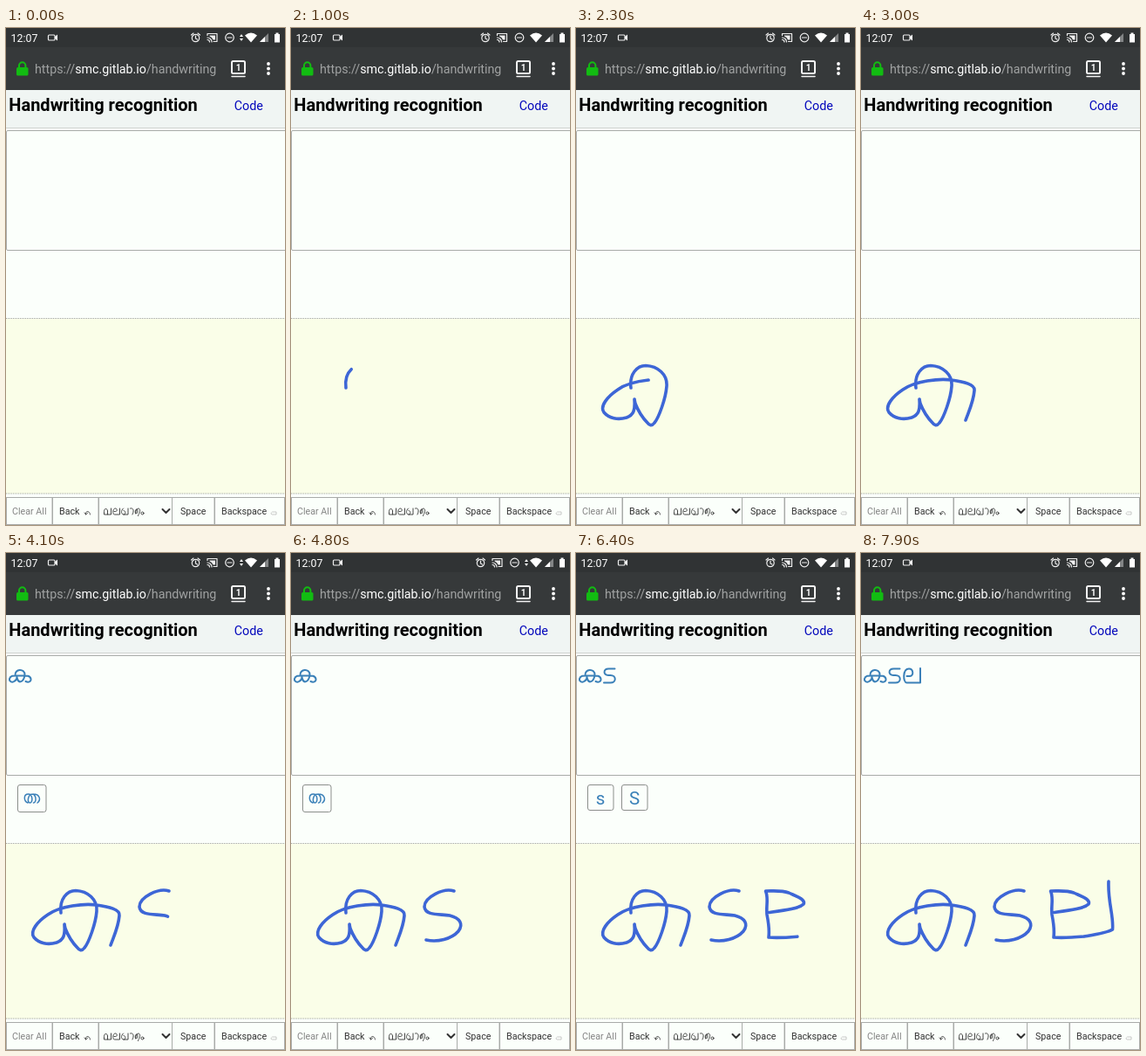
Write an HTML page that moves like this. It is 320 px wide and 569 px high and loops after 8 s.

```html
<!DOCTYPE html>
<html lang="en">
<head>
<meta charset="utf-8">
<title>Handwriting recognition</title>
<style>
  html, body { margin: 0; width: 100%; height: 100%; overflow: hidden; background: #fbfffb; }
  svg { display: block; width: 100vw; height: 100vh; }
  text { font-family: Roboto, "Noto Sans", sans-serif; }
  .line { fill: none; stroke-linecap: round; stroke-linejoin: round; }
  .ink { stroke: #3d66d6; stroke-width: 3.6; }
  .glyph { stroke: #3a80b8; stroke-width: 2; }
  .box { fill: #fbfffb; stroke: #a9aba9; }
  .key { fill: #fbfffb; stroke: #8c8e8c; }
  .dots { stroke: #9c9e98; stroke-dasharray: 1 1; }
  .btn { font-size: 10.7px; fill: #333; }
</style>
</head>
<body>
<svg viewBox="0 0 320 569">
  <rect width="320" height="569" fill="#fbfffb"/>

  <!-- status bar -->
  <rect width="320" height="71" fill="#36393a"/>
  <rect width="320" height="22" fill="#303334"/>
  <g fill="#fff">
    <text x="5.5" y="15.5" font-size="12.4">12:07</text>
    <path d="M56 10l3-2.5v7l-3-2.5z"/>
    <path d="M274 8.5Q281 2.500 288 8.500L281 16.500z"/>
    <path d="M301 6v10h-10z" opacity=".4"/>
    <path d="M297 10v6h-6z"/>
    <path d="M308 7h1.500V5.500h3V7h1.500v9.500h-6z"/>
    <path id="traffic" d="M268 10l2-3 2 3zM268 12l2 3 2-3z"/>
  </g>
  <g class="line" stroke="#eee" stroke-width="1.200">
    <rect x="48.500" y="8" width="7.500" height="6" rx="1"/>
    <g id="icons">
      <circle cx="217.500" cy="11.500" r="4.200"/>
      <path d="M217.500 9v3l2 1M212.500 8l2.500-2M222.500 8l-2.500-2"/>
      <path d="M231 8.500V6.500H242V15.500H238M231 11a5 5 0 0 1 5 5M231 13.500a2.500 2.500 0 0 1 2.500 2.500"/>
      <path d="M233.500 8.500h6.500v5h-2.500q-1-3-4-4z" fill="#eee" stroke="none"/>
      <circle cx="256.500" cy="11" r="4.800"/>
      <path d="M254 11h5"/>
    </g>
  </g>

  <!-- address bar -->
  <rect x="12" y="45" width="13.500" height="9.500" rx="1.500" fill="#12bc12"/>
  <path class="line" d="M15 45v-2a3.700 3.700 0 0 1 7.400 0v2" stroke="#12bc12" stroke-width="2"/>
  <text x="33" y="52" font-size="14.25" fill="#a0a2a2">https://<tspan fill="#fff">smc.gitlab.io</tspan>/handwriting</text>
  <g class="line" stroke="#f4f4f4" stroke-width="2">
    <rect x="259" y="38" width="15" height="14" rx="1.500"/>
    <path d="M259 55.500h15" stroke-width="1.500"/>
  </g>
  <text x="266.500" y="49" font-size="10" font-weight="700" fill="#fff" text-anchor="middle">1</text>
  <g fill="#fff"><circle cx="301" cy="41" r="1.900"/><circle cx="301" cy="46.500" r="1.900"/><circle cx="301" cy="52" r="1.900"/></g>

  <!-- page -->
  <rect y="71" width="320" height="43" fill="#f0f5f3"/>
  <path d="M0 114.500h320" stroke="#cfd2d0"/>
  <text x="3.300" y="95" font-size="20" font-weight="700">Handwriting recognition</text>
  <text x="261.700" y="94" font-size="14.3" fill="#0408bc">Code</text>
  <rect class="box" x=".5" y="117.500" width="321" height="137" rx="1.500"/>
  <rect y="333" width="320" height="200" fill="#fafee8"/>
  <path class="dots" d="M0 332.500h320M0 533h320"/>

  <!-- recognised letters -->
  <g class="line glyph" transform="translate(0 -.5)">
    <path data-on="3200" d="M10 147C7 149.500 3.500 147.500 4 144.500C5 140 10 141 16 141S27.500 140 28.500 144.500C29 148 25.500 149 22.500 147.500M10.500 141C9.500 132.500 22 132.500 21.500 140C21 145 19 147.500 16 148C13 147.500 13 144.500 12.500 142.500C12.500 145 12 146 10 147"/>
    <path data-on="5000" d="M44.500 133H37.500C31 133 31 140.500 37 140.500H39.500C46.500 140.500 46.500 149 39.500 149H32"/>
    <path data-on="7250" d="M52.500 141.500H56C61 141 60 133 55 133C47.500 133 48 149 52.500 149H68V132.500"/>
  </g>

  <!-- suggestions -->
  <g data-on="3200" data-off="5000">
    <rect class="key" x="13.500" y="265.500" width="32.500" height="31" rx="2.500"/>
    <path class="line glyph" d="M25 286C20 284 20 276 25.500 276C31 276 31 286 27.500 286C24 286 24.500 276 31 276C39.500 276 40 283 36 286M31 276C35 278 35 286 31.500 286" style="stroke-width:1.5"/>
  </g>
  <g data-on="5000" data-off="7250" font-size="20.5" fill="#3a80b8" text-anchor="middle">
    <rect class="key" x="13.500" y="265.500" width="29.500" height="29" rx="2.500"/>
    <rect class="key" x="52.500" y="265.500" width="29.500" height="29" rx="2.500"/>
    <text x="28" y="287.500">s</text>
    <text x="67" y="287.500">S</text>
  </g>

  <!-- handwriting -->
  <g class="line ink">
    <path pathLength="1" d="M63 412C61 396 70 386.500 80 386.500C94 387 105 397 104 410C103 424 95 446 90 452C87 456 84 455 82 452C76 446 72 440 68 430L67 425C68 438 66 443 58 446C48 449 38 447 32 440C27 433 36 422 48 414C62 404 90 401 104 403C118 405 131 408 130 415C129 428 124 438 120 449"/>
    <path pathLength="1" d="M187 387C175 383 153 394 153 405C154 416 172 413 182 415C194 418 198 425 192 433C184 442 168 446 155 443"/>
    <path pathLength="1" d="M221.500 411.500C240 409 256 407 261 402C264 396 250 392 244 389C236 386 228 387 217.500 387C221 395 218 402 219 414C221 424 222 432 221 440C232 441 244 440 256 439C268 437 282 435 288.500 431C290 415 283 400 284 376"/>
  </g>

  <!-- buttons -->
  <g class="box">
    <rect x=".5" y="537.500" width="52.500" height="31"/>
    <rect x="53.500" y="537.500" width="52.500" height="31"/>
    <rect x="106.500" y="537.500" width="84" height="31"/>
    <rect x="190.500" y="537.500" width="48.500" height="31"/>
    <rect x="239.500" y="537.500" width="80" height="31"/>
  </g>
  <g class="btn">
    <text x="7" y="557" style="fill:#858585">Clear All</text>
    <text x="61" y="557">Back</text>
    <text x="200" y="557">Space</text>
    <text x="247" y="557">Backspace</text>
  </g>
  <g class="line" stroke="#333">
    <path d="M91.500 557C90.500 552.500 96 552 96.500 557M90 555l1.500 2 2-1.500" stroke-width=".8"/>
    <path d="M179.500 551l4 4 4-4" stroke-width="2"/>
    <path d="M304 555.500l1.500-1.500h4.500v3h-4.500z" stroke="#bbb" stroke-width=".8"/>
    <!-- Malayalam language name -->
    <path d="M116.500 553V557H112.500V553.500C112.500 549.500 116.500 549.500 116.500 553M116.500 557H120.500V550M124 553.500H125.500C128 553.500 127.500 550 125.500 550C122 550 122 557 124.500 557H130.500V550M134.500 550C131 553 132.500 557 135 557C137.500 557 137.500 552.500 135 552.500M135 557H140V550M142.500 550C146.500 549 147 553 145 557M148.500 556C147 551 151 549 151 553C151 557 148.500 556 149 553.500C149.500 549 154.500 549 153.500 553.500C153 557 151.500 556.500 151.500 558.500" stroke-width=".9"/>
    <circle cx="156.500" cy="555.500" r="1.500" stroke-width=".9"/>
  </g>
</svg>
<script>
  const LOOP = 8000;
  // per stroke: [time in ms, drawn fraction]
  const pace = [
    [[900, 0], [1600, .43], [2800, 1]],
    [[3800, 0], [4100, .56], [4600, .77], [4750, 1]],
    [[5600, 0], [6400, .66], [6900, 1]]
  ];
  const strokes = document.querySelectorAll('.ink path');
  const timed = document.querySelectorAll('[data-on]');
  const traffic = document.getElementById('traffic');
  const icons = document.getElementById('icons');
  const show = (el, on) => { el.style.display = on ? '' : 'none'; };

  function progress(keys, t) {
    if (t <= keys[0][0]) return 0;
    const i = keys.findIndex(k => k[0] > t);
    if (i < 0) return 1;
    const [t0, p0] = keys[i - 1], [t1, p1] = keys[i];
    return p0 + (p1 - p0) * (t - t0) / (t1 - t0);
  }

  function draw(now) {
    const t = now % LOOP;
    strokes.forEach((path, i) => {
      const p = progress(pace[i], t);
      show(path, p > 0);
      path.style.strokeDasharray = p < 1 ? `${p} 2` : 'none';
    });
    timed.forEach(el => show(el, t >= +el.dataset.on && t < +(el.dataset.off || LOOP)));

    // the other icons close the gap while no data moves
    const busy = t < 200 || t >= 3800 && t < 5300;
    show(traffic, busy);
    icons.setAttribute('transform', `translate(${busy ? 0 : 5.5})`);
    requestAnimationFrame(draw);
  }
  draw(0);
</script>
</body>
</html>
```
